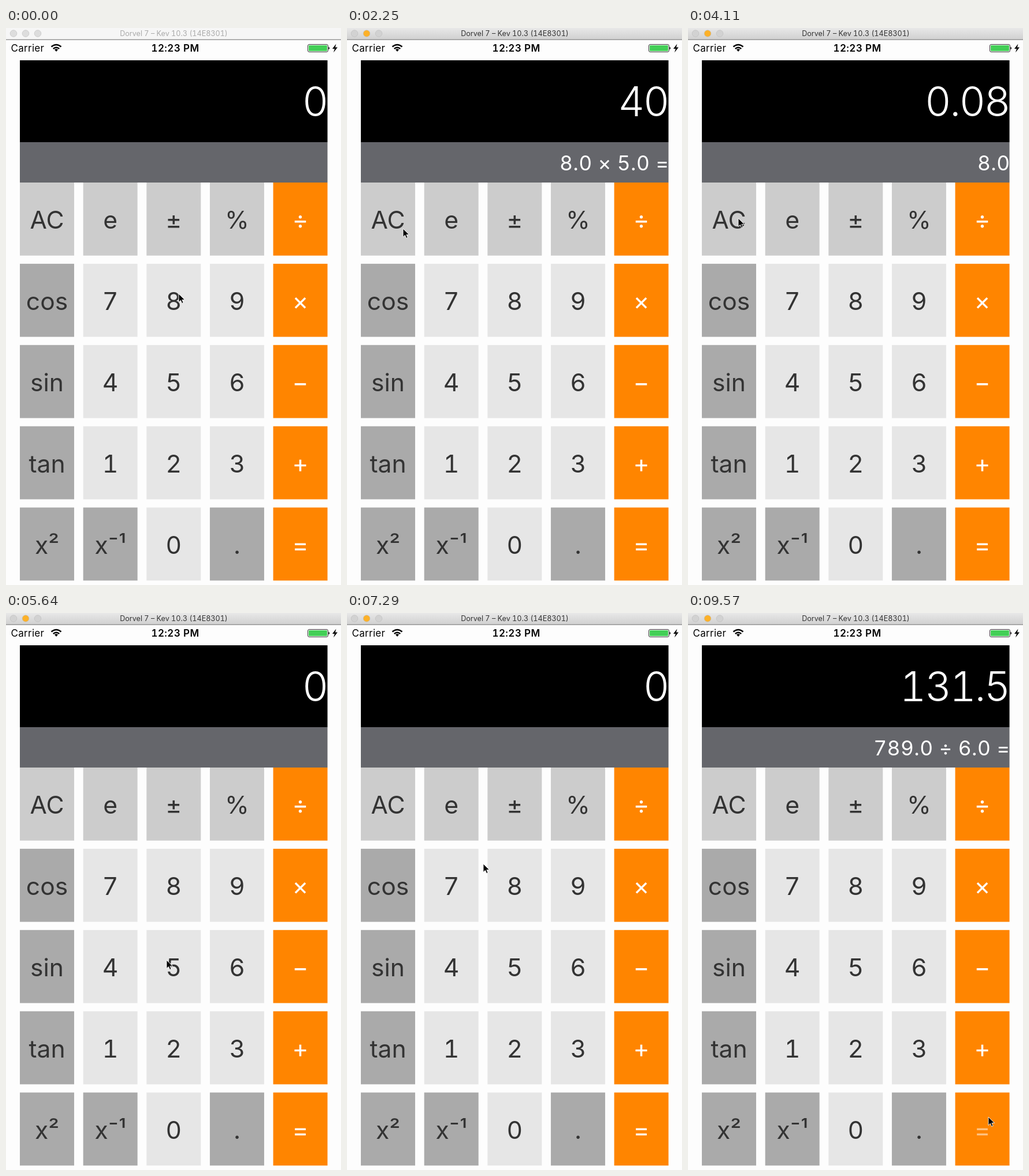
These frames come from a looping animation (580x966 px, 9.6 s). An HTML page:

```html
<!DOCTYPE html>
<html lang="en">
<head>
<meta charset="utf-8">
<title>Calculator</title>
<style>
  html, body { margin: 0; width: 100%; height: 100%; overflow: hidden; background: #fdfdfd; }
  svg { display: block; width: 100vw; height: 100vh; font-family: Inter, Roboto, sans-serif; font-variant-numeric: tabular-nums; }
  .key { font-size: 42.6px; text-anchor: middle; }
  .screen { fill: #fff; text-anchor: end; }
</style>
</head>
<body>
<svg viewBox="0 0 580 966">
  <defs>
    <linearGradient id="active" x2="0" y2="1">
      <stop stop-color="#e8e8e8"/><stop offset="1" stop-color="#d0d0d0"/>
    </linearGradient>
  </defs>
  <rect width="580" height="966" fill="#fdfdfd"/>

  <rect id="bar" width="580" height="20"/>
  <rect y="19.5" width="580" height="1.5" fill="#999"/>
  <g id="lights" stroke="#bbb" stroke-width=".6">
    <circle cx="13" cy="9.5" r="5.8"/><circle cx="34" cy="9.5" r="5.8"/><circle cx="55" cy="9.5" r="5.8"/>
  </g>
  <text id="title" x="290.5" y="14" font-size="12.6" text-anchor="middle">Dorvel 7 – Kev 10.3 (14E8301)</text>

  <text x="8.5" y="41" font-size="17" letter-spacing=".3">Carrier</text>
  <g fill="none" stroke="#000" stroke-width="2.5">
    <path d="M78.5 32.5Q87 25.5 95.5 32.5M81.8 36Q87 31.5 92.2 36"/>
    <path d="M84 37.5Q87 35 90 37.5L87 41Z" fill="#000" stroke="none"/>
  </g>
  <text x="293" y="41" font-size="17" font-weight="600" letter-spacing=".4" text-anchor="middle">12:23 PM</text>
  <rect x="522.5" y="28.5" width="35" height="13" rx="2.5" fill="#fff" stroke="#333"/>
  <rect x="524" y="30" width="32" height="10" rx="1" fill="#43cf57"/>
  <path d="M558.5 32.5Q562 35 558.5 37.5Z"/>
  <path d="M571.5 27.5L565 36H569L567 42.5L574 33.5H570Z"/>

  <rect x="24" y="56" width="532.6" height="142"/>
  <rect x="24" y="198" width="532.6" height="70" fill="#65666b"/>
  <text id="display" class="screen" x="556" y="153" font-size="70.8" font-weight="300" letter-spacing="-2.6"></text>
  <text id="history" class="screen" x="557.5" y="247" font-size="35.4" letter-spacing=".4"></text>

  <g id="keys"></g>
  <path id="pointer" d="M0 0V14.5L3.4 11.3L5.7 16.5L8.1 15.5L5.9 10.4H10.6Z" stroke="#fff" stroke-width=".9"/>
</svg>
<script>
const LOOP = 9600;
const $ = id => document.getElementById(id);

const rows = [
  ['AC', 'e', '±', '%', '÷'],
  ['cos', '7', '8', '9', '×'],
  ['sin', '4', '5', '6', '−'],
  ['tan', '1', '2', '3', '+'],
  ['x²', 'x⁻¹', '0', '.', '=']
];

// Each press: time, key, display and history afterwards, pointer position
const presses = [
  [150, '8', '8', '', 299, 461],
  [720, '×', '8', '8.0 × ...', 508, 476],
  [1250, '5', '5', '8.0 × ...', 288, 612],
  [1780, '=', '40', '8.0 × 5.0 =', 512, 888],
  [2420, 'AC', '0', '', 97, 348],
  [2980, '8', '8', '', 290, 474],
  [3520, '%', '0.08', '8.0', 396, 335],
  [4990, 'AC', '0', '', 87, 330],
  [5770, '5', '5', '', 278, 602],
  [6320, 'x²', '25', '5.0', 74, 888],
  [6980, 'AC', '0', '', 84, 338],
  [7450, '7', '7', '', 186, 476],
  [7770, '8', '78', '', 288, 474],
  [8090, '9', '789', '', 396, 474],
  [8540, '÷', '789', '789.0 ÷ ...', 506, 345],
  [9040, '6', '6', '789.0 ÷ ...', 398, 606],
  [9490, '=', '131.5', '789.0 ÷ 6.0 =', 520, 874]
];

// The pointer rests around each press and passes a few extra points
const path = [
  ...presses.flatMap(([t, , , , x, y]) => [[t - 110, x, y], [t + 60, x, y]]),
  [2250, 97, 348], [4080, 87, 330], [5640, 278, 602], [7290, 236, 435], [8850, 402, 522]
].sort((a, b) => a[0] - b[0]);

function svgNode(tag, attributes, text = '') {
  const node = document.createElementNS('http://www.w3.org/2000/svg', tag);
  for (const name in attributes) node.setAttribute(name, attributes[name]);
  node.textContent = text;
  $('keys').append(node);
  return node;
}

function keyColor(label, row, column) {
  if (column === 4) return '#ff8500';
  if (row === 0) return '#ccc';
  return /^\d$/.test(label) ? '#e6e6e6' : '#aaa';
}

const labels = {};
rows.forEach((row, r) => row.forEach((label, c) => {
  const x = 24 + c * 109.65, y = 268 + r * 140.9;
  svgNode('rect', { x, y, width: 94, height: 126.7, fill: keyColor(label, r, c) });
  labels[label] = svgNode('text', {
    class: 'key', x: x + 47, y: y + 80, fill: c === 4 ? '#fff' : '#333'
  }, label);
}));

function pointerAt(t) {
  const i = path.findIndex(point => point[0] > t);
  if (i === 0) return path[0].slice(1);
  if (i < 0) return path[path.length - 1].slice(1);
  const [t0, x0, y0] = path[i - 1], [t1, x1, y1] = path[i];
  const u = (t - t0) / (t1 - t0), k = u * u * (3 - 2 * u);
  return [x0 + (x1 - x0) * k, y0 + (y1 - y0) * k];
}

// A label dims while held, then fades back
function labelOpacity(t, pressTime) {
  const since = t - pressTime;
  if (since < -90 || since > 250) return 1;
  return 0.25 + 0.75 * Math.max(0, since) / 250;
}

function render(t) {
  const done = presses.filter(press => press[0] <= t).pop();
  $('display').textContent = done ? done[2] : '0';
  $('history').textContent = done ? done[3] : '';

  for (const label in labels) {
    const fades = presses.filter(press => press[1] === label).map(press => labelOpacity(t, press[0]));
    labels[label].setAttribute('opacity', Math.min(1, ...fades));
  }

  const active = t >= 60;
  $('bar').setAttribute('fill', active ? 'url(#active)' : '#f6f6f6');
  $('title').setAttribute('fill', active ? '#333' : '#aaa');
  [...$('lights').children].forEach((light, i) =>
    light.setAttribute('fill', active && i === 1 ? '#fdb128' : active ? '#d2d2d2' : '#ddd'));

  $('pointer').setAttribute('transform', `translate(${pointerAt(t)})`);
}

const start = performance.now();
function tick() {
  render((performance.now() - start) % LOOP);
  requestAnimationFrame(tick);
}
tick();
</script>
</body>
</html>
```
